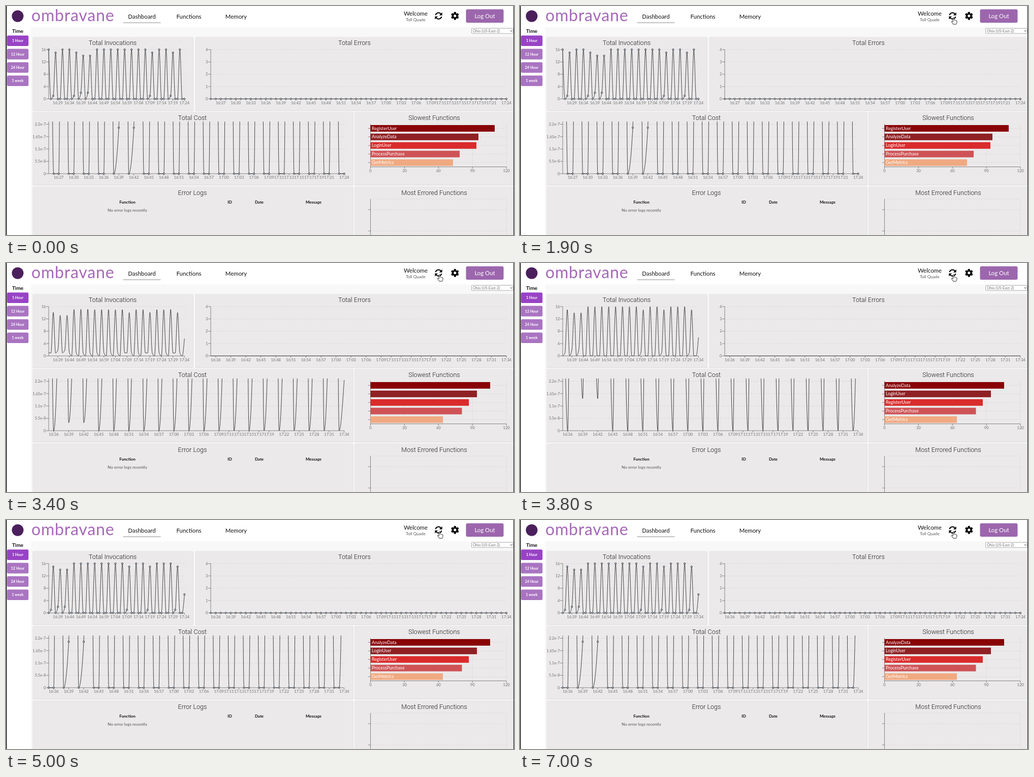
An HTML page that plays this animation: 1000x452 px, repeating every 7200 ms.

```html
<!DOCTYPE html>
<html lang="en">
<head>
<meta charset="utf-8">
<title>Dashboard</title>
<style>
  html, body { margin: 0; width: 100%; height: 100%; overflow: hidden; background: #fff; }
  svg { display: block; width: 100%; height: 100%; font-family: Lato, sans-serif; }
  .title { font: 300 12.6px Roboto, sans-serif; fill: #1c1c1e; }
  .nav { font-size: 11.4px; fill: #111; }
  .small { font-size: 8.2px; fill: #555; }
  .head { font-size: 8px; font-weight: 700; fill: #111; }
  .btn { font-size: 7.2px; font-weight: 700; fill: #fff; }
  .axis { font-size: 7.6px; fill: #717171; }
  .bar { font-size: 8.8px; fill: #fff; }
  .rule { stroke: #6b6b6b; stroke-width: .8; fill: none; }
  .grid { stroke: #d6d4d5; stroke-width: .8; stroke-dasharray: 3 2; fill: none; }
  .line { stroke: #3a3a3c; stroke-width: .95; fill: none; }
  .dots circle { fill: #bccddb; stroke: #26282c; stroke-width: .85; }
</style>
</head>
<body>
<svg id="stage" viewBox="0 0 1000 452" preserveAspectRatio="none">
  <defs>
    <clipPath id="costClip"><rect x="83" y="228" width="584" height="104"/></clipPath>
  </defs>
</svg>
<script>
const LOOP = 7200, STEP = 100, COUNT = 60, SHIFT = 10;
const stage = document.getElementById('stage');

function el(tag, attrs, parent = stage) {
  const node = document.createElementNS('http://www.w3.org/2000/svg', tag);
  for (const k in attrs) node.setAttribute(k, attrs[k]);
  return parent.appendChild(node);
}
function text(str, x, y, cls, anchor = 'middle', parent = stage, extra = {}) {
  const node = el('text', { x, y, class: cls, 'text-anchor': anchor, ...extra }, parent);
  node.textContent = str;
  return node;
}
const rect = (x, y, width, height, fill, extra) => el('rect', { x, y, width, height, fill, ...extra });
const path = (d, cls, parent = stage) => el('path', { d, class: cls }, parent);
const show = (node, on) => node.setAttribute('visibility', on ? 'visible' : 'hidden');
const mix = (a, b, p) => a + (b - a) * p;
const clamp = v => Math.min(1, Math.max(0, v));

// CSS "ease": cubic-bezier(.25, .1, .25, 1)
function ease(x) {
  if (x <= 0 || x >= 1) return clamp(x);
  let lo = 0, hi = 1, s;
  for (let i = 0; i < 24; i++) {
    s = (lo + hi) / 2;
    if (.75 * s * (1 - s) + s ** 3 < x) lo = s; else hi = s;
  }
  return .3 * s * (1 - s) ** 2 + 3 * s * s * (1 - s) + s ** 3;
}

// Monotone cubic through evenly spaced points
function monotone(x0, dx, ys) {
  const n = ys.length, s = [], m = [];
  for (let i = 0; i < n - 1; i++) s[i] = (ys[i + 1] - ys[i]) / dx;
  for (let i = 1; i < n - 1; i++) {
    const a = s[i - 1], b = s[i];
    m[i] = (Math.sign(a) + Math.sign(b)) * Math.min(Math.abs(a), Math.abs(b), Math.abs(a + b) / 4);
  }
  m[0] = (3 * s[0] - m[1]) / 2;
  m[n - 1] = (3 * s[n - 2] - m[n - 2]) / 2;
  let d = `M${x0},${ys[0].toFixed(2)}`;
  for (let i = 0; i < n - 1; i++) {
    const x = x0 + i * dx, h = dx / 3;
    d += `C${(x + h).toFixed(2)},${(ys[i] + m[i] * h).toFixed(2)} ` +
         `${(x + 2 * h).toFixed(2)},${(ys[i + 1] - m[i + 1] * h).toFixed(2)} ` +
         `${(x + dx).toFixed(2)},${ys[i + 1].toFixed(2)}`;
  }
  return d;
}

// One sample per minute, a burst every third
const weak = { 1: 15, 4: 15, 5: 14, 6: 14, 15: 15, 18: 15, 22: 15, 23: 6 };
const burst = k => weak[k] || 16;
function invocations(i) {
  if (i % 3 === 0) return burst(i / 3);
  return i % 3 === 2 && i < 68 ? 16 - burst((i + 1) / 3) : 0;
}
function cost(i) {
  if (i % 3 === 0) return i === 69 ? 13.1 : 35;
  return i === 14 || i === 17 ? 2.05 : 0;
}

const range = (a, b, step) => Array.from({ length: Math.floor((b - a) / step) + 1 }, (_, i) => a + i * step);
const clock = m => `${16 + Math.floor(m / 60)}:${String(m % 60).padStart(2, '0')}`;
const wideTicks = [
  [...range(27, 69, 3), ...range(71, 81, 2), 84],
  [...range(36, 69, 3), ...range(71, 79, 2), ...range(82, 94, 3)]
];
const fiveTicks = [range(29, 84, 5), range(39, 94, 5)];

function lineChart({ x0, x1, top, base, max, labels, ticks, data, start, clip }) {
  const dx = (x1 - x0) / (COUNT - 1);
  const y = v => base - v / max * (base - top);
  labels.forEach((label, i) => {
    const ty = mix(base, top, i / (labels.length - 1));
    if (i) path(`M${x0},${ty}H${x1}`, 'grid');
    path(`M${x0 - 5},${ty}H${x0}`, 'rule');
    text(label, x0 - 5.5, ty + 2.7, 'axis', 'end');
  });
  path(`M${x0},${clip ? 228 : top}V${base}H${x1}`, 'rule');

  const axes = ticks.map((set, s) => {
    const g = el('g', {});
    for (const min of set) {
      const x = x0 + (min - 25 - s * SHIFT) * dx;
      path(`M${x},${base}v3.5`, 'rule', g);
      text(clock(min), x, base + 10.2, 'axis', 'middle', g);
    }
    return g;
  });
  const line = path('', 'line');
  if (clip) line.setAttribute('clip-path', `url(#${clip})`);

  const values = [0, SHIFT].map(off => Array.from({ length: COUNT }, (_, i) => y(data(i + off))));
  const dots = values.map(ys => {
    const g = el('g', { class: 'dots' });
    ys.forEach((cy, i) => cy >= top - 5 && el('circle', { cx: x0 + i * dx, cy, r: 1.6 }, g));
    return g;
  });

  return t => {
    const raw = clamp((t - start) / 1500), p = ease(raw);
    line.setAttribute('d', monotone(x0, dx, values[0].map((v, i) => mix(v, values[1][i], p))));
    show(axes[0], raw === 0);
    show(axes[1], raw > 0);
    show(dots[0], raw === 0);
    show(dots[1], raw === 1);
  };
}

function barChart(start) {
  const x0 = 717.5, mid = i => 241.5 + i * 16.9;
  const ends = [[962, 930, 926, 893, 880], [953, 927, 911, 897.5, 860]];
  const names = [
    ['RegisterUser', 'AnalyzeData', 'LoginUser', 'ProcessPurchase', 'GetMetrics'],
    ['AnalyzeData', 'LoginUser', 'RegisterUser', 'ProcessPurchase', 'GetMetrics']
  ];
  const fills = ['#880306', '#8f2024', '#da2b2c', '#cf5356', '#f0aa82'];
  for (let i = 0; i < 5; i++) {
    const x = x0 + i * 66.9;
    if (i) path(`M${x},233V317.5`, 'grid');
    path(`M${x},317.5v3.5`, 'rule');
    text(i * 30, x, 327.6, 'axis');
    path(`M${x0},${mid(i)}H985`, 'grid');
    path(`M${x0 - 4.5},${mid(i)}H${x0}`, 'rule');
  }
  path(`M${x0},233V317.5H985`, 'rule');
  const bars = fills.map((fill, i) => rect(x0, mid(i) - 6.5, 0, 13, fill));
  const labels = names.map(set => {
    const g = el('g', {});
    set.forEach((name, i) => text(name, 720, mid(i) + 3, 'bar', 'start', g));
    return g;
  });
  return t => {
    const raw = clamp((t - start) / 400), p = ease(raw);
    bars.forEach((bar, i) => bar.setAttribute('width', mix(ends[0][i], ends[1][i], p) - x0));
    show(labels[0], raw === 0);
    show(labels[1], raw === 1);
  };
}

function header() {
  el('circle', { cx: 23, cy: 20, r: 11.5, fill: '#4b1f5c' });
  text('ombravane', 50, 29.5, '', 'start', stage, { 'font-size': 32, 'letter-spacing': .8, fill: '#a768b9' });
  text('Dashboard', 267.5, 25, 'nav');
  text('Functions', 360, 25.3, 'nav');
  text('Memory', 453, 25.3, 'nav');
  path('M230.5,33H304.5', 'rule');
  text('Welcome', 806.5, 18.6, 'nav');
  text('Toll Quade', 806.5, 29.6, 'small');

  const sync = el('g', { transform: 'translate(851.5 19.5)', fill: 'none', stroke: '#0b0b0b', 'stroke-width': 2.2 });
  for (const turn of [0, 180]) {
    const half = el('g', { transform: `rotate(${turn})` }, sync);
    el('path', { d: 'M-5.9,-1.6A6,6 0 0 1 4.6,-3.9' }, half);
    el('path', { d: 'M7.2,-7V-1H1.2Z', fill: '#0b0b0b', stroke: 'none' }, half);
  }

  const gear = el('g', { transform: 'translate(883.8 19.6)', fill: '#0b0b0b' });
  for (let a = 0; a < 180; a += 60)
    el('rect', { x: -2.2, y: -7.8, width: 4.4, height: 15.6, rx: .8, transform: `rotate(${a})` }, gear);
  el('circle', { r: 5.9 }, gear);
  el('circle', { r: 2.5, fill: '#fff' }, gear);

  rect(905.5, 6.5, 74, 26.5, '#9c66ad', { rx: 3 });
  text('Log Out', 942.5, 24, 'nav', 'middle', stage, { style: 'fill:#fff' });
}

function sidebar() {
  text('Time', 23, 52.6, 'head', 'middle', stage, { style: 'font-size:10px' });
  ['1 Hour', '12 Hour', '24 Hour', '1 week'].forEach((label, i) => {
    const y = 58.3 + i * 26.3;
    rect(2, y, 42.3, 20.8, i ? '#a974c1' : '#9843c5', { rx: 2.5 });
    text(label, 23, y + 13, 'btn');
  });
}

function panels() {
  const boxes = [
    [52.5, 61, 315.5, 145], [372, 61, 626, 145], [52.5, 208.5, 630.5, 144.5],
    [686, 208.5, 312, 144.5], [52.5, 356, 630.5, 100], [686, 356, 312, 100]
  ];
  for (const [x, y, w, h] of boxes) {
    rect(x, y + .8, w + .6, h, '#d5d3d4', { rx: 1.5 });
    rect(x, y, w, h, '#ebe9ea', { rx: 1.5 });
  }
  const titles = [
    ['Total Invocations', 210, 77.4], ['Total Errors', 686, 77.4], ['Total Cost', 367, 224.8],
    ['Slowest Functions', 843, 224.8], ['Error Logs', 367, 372.6], ['Most Errored Functions', 843, 372.6]
  ];
  for (const [str, x, y] of titles) text(str, x, y, 'title');

  rect(916.5, 44.2, 82, 10, '#fff', { stroke: '#8a8a8a', 'stroke-width': .7, rx: 1 });
  text('Ohio (US-East-2)', 919, 51.8, 'axis', 'start', stage, { style: 'font-size:7.2px' });
  path('M992.6,48l2.1,2.3 2.1,-2.3', 'line');

  text('Function', 239, 389.8, 'head');
  text('ID', 440.5, 389.8, 'head');
  text('Date', 498.5, 389.8, 'head');
  text('Message', 605.5, 389.8, 'head');
  text('No error logs recently', 239, 406.4, 'small');

  path('M717.5,381H985V452M717.5,402H985M717.5,444H985', 'grid');
  path('M717.5,381V452M713,402h4.5M713,444h4.5', 'rule');
}

function pointer() {
  const style = { fill: '#fff', stroke: '#111', 'stroke-width': .9, 'stroke-linejoin': 'round' };
  const arrow = el('path', { d: 'M0,0V11L2.6,8.7 4.3,12.4 6,11.6 4.4,8H7.8Z', ...style });
  const hand = el('path', {
    d: 'M-1,.8Q-1,-.3 0,-.3T1,.8V4.6Q2.2,3.9 3,5Q4.2,4.4 5,5.5Q6.7,5.2 6.7,7V9.4Q6.5,11.2 5.3,12.8H-.6' +
       'Q-2,10.6 -3.8,8.2Q-4.2,6.8 -2.8,6.8L-1,8.2Z', ...style
  });
  return t => {
    const p = ease((t - 100) / 1000);
    const x = mix(930, 853.3, p), y = mix(456, 23.2, p);
    const over = p > .985;
    for (const node of [arrow, hand]) node.setAttribute('transform', `translate(${x} ${y})`);
    show(arrow, t >= 100 && !over);
    show(hand, over);
  };
}

rect(49, 42, 950, 410, '#f9f8f9');
rect(0, 0, 1.4, 452, '#0c0c0c');
rect(998.9, 0, 1.1, 452, '#2a2a2a');
header();
sidebar();
panels();

const parts = [
  lineChart({ x0: 84, x1: 351.3, top: 86, base: 183.4, max: 16, labels: [0, 4, 8, 12, 16],
    ticks: fiveTicks, data: invocations, start: 2360 }),
  lineChart({ x0: 403, x1: 985, top: 86, base: 183.4, max: 4, labels: [0, 1, 2, 3, 4],
    ticks: wideTicks, data: () => 0, start: 2360 }),
  lineChart({ x0: 84, x1: 665.7, top: 233.5, base: 331, max: 2.2,
    labels: ['0', '5.5e-8', '1.1e-7', '1.65e-7', '2.2e-7'],
    ticks: wideTicks, data: cost, start: 3185, clip: 'costClip' }),
  barChart(3050),
  pointer()
];

let last = -1;
function frame() {
  const t = Math.floor(performance.now() % LOOP / STEP) * STEP;
  if (t !== last) parts.forEach(draw => draw(t));
  last = t;
  requestAnimationFrame(frame);
}
frame();
</script>
</body>
</html>
```
